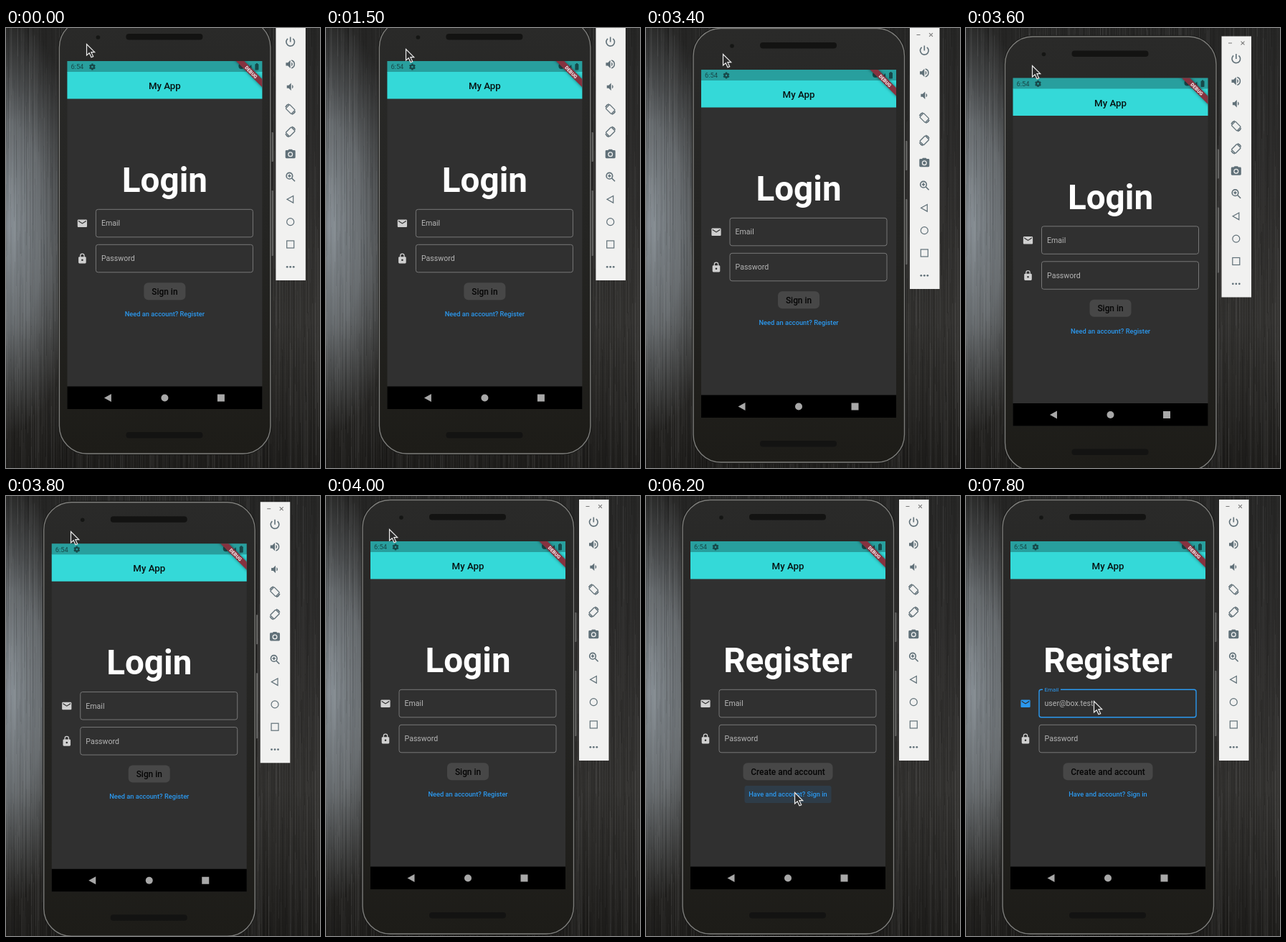
These frames come from a looping animation (438 by 612 pixels, 8000 ms). An HTML page with a canvas:

```html
<!DOCTYPE html>
<html lang="en">
<head>
<meta charset="utf-8">
<title>Login and register</title>
<style>
html, body { margin: 0; overflow: hidden; background: #222; }
canvas { display: block; }
</style>
</head>
<body>
<canvas id="stage" width="438" height="612"></canvas>
<script>
const W = 438, H = 612, LOOP = 8000, STEP = 100;
const c = document.getElementById('stage').getContext('2d');
const BLUE = '#2b98ee', SLATE = '#607078';

const MAIL = new Path2D('M20 4H4c-1.1 0-2 .9-2 2v12c0 1.1.9 2 2 2h16c1.1 0 2-.9 2-2V6c0-1.1-.9-2-2-2zm0 4l-8 5-8-5V6l8 5 8-5v2z');
const LOCK = new Path2D('M18 8h-1V6a5 5 0 0 0-10 0v2H6a2 2 0 0 0-2 2v10a2 2 0 0 0 2 2h12a2 2 0 0 0 2-2V10a2 2 0 0 0-2-2zm-6 9a2 2 0 1 1 0-4 2 2 0 0 1 0 4zm3.1-9H8.9V6a3.1 3.1 0 0 1 6.2 0z');
const SPEAKER = new Path2D('M3 9v6h4l5 5V4L7 9H3zM16.5 12A4.5 4.5 0 0 0 14 8v8a4.5 4.5 0 0 0 2.5-4z');
const WAVE = new Path2D('M14 3.2v2.1a7 7 0 0 1 0 13.4v2.1a9 9 0 0 0 0-17.6z');
const CAMERA = new Path2D('M9 2L7.2 4H4a2 2 0 0 0-2 2v12a2 2 0 0 0 2 2h16a2 2 0 0 0 2-2V6a2 2 0 0 0-2-2h-3.2L15 2zM17 12a5 5 0 1 1-10 0 5 5 0 0 1 10 0z');
const ARROW = new Path2D('M0 0V15.5L3.7 12.2L6.5 18.3L9.2 17.1L6.4 11.2H11.2Z');

const clamp01 = v => Math.min(1, Math.max(0, v));
const progress = (t, from, to) => clamp01((t - from) / (to - from));

// Follows straight moves, each given as {from, to, x, y}
function follow(start, moves, t) {
  return moves.reduce((p, m) => {
    const k = progress(t, m.from, m.to);
    return { x: p.x + (m.x - p.x) * k, y: p.y + (m.y - p.y) * k };
  }, start);
}
const windowAt = t => follow({ x: 23.4, y: -17 }, [
  { from: 3200, to: 3400, x: 15, y: -5 },
  { from: 3400, to: 3600, x: 3.5, y: 6.5 },
  { from: 3600, to: 4000, x: 0, y: 0 }
], t);
const pointerAt = t => follow({ x: 112, y: 22 }, [
  { from: 300, to: 500, x: 194, y: 382 },
  { from: 600, to: 700, x: 384, y: 524 },
  { from: 700, to: 800, x: 6, y: 40 },
  { from: 800, to: 900, x: 229, y: 210 },
  { from: 1000, to: 1500, x: 111, y: 29 },
  { from: 3200, to: 3400, x: 107, y: 36 },
  { from: 3400, to: 3600, x: 92, y: 52 },
  { from: 3600, to: 4000, x: 88, y: 46 },
  { from: 4100, to: 4600, x: 211, y: 405 },
  { from: 5000, to: 5300, x: 207, y: 412 },
  { from: 6500, to: 6900, x: 178, y: 285 }
], t);

function at(x, y, draw) {
  c.save();
  c.translate(x, y);
  draw();
  c.restore();
}
function box(x, y, w, h, r, fill, stroke, width = 1) {
  c.beginPath();
  c.roundRect(x, y, w, h, r);
  if (fill) { c.fillStyle = fill; c.fill(); }
  if (stroke) { c.strokeStyle = stroke; c.lineWidth = width; c.stroke(); }
}
function text(str, x, y, size, color, weight = 400, align = 'center') {
  c.font = `${weight} ${size}px Roboto, sans-serif`;
  c.textAlign = align;
  c.fillStyle = color;
  c.fillText(str, x, y);
}
function triangle(x, y, w, h) {
  c.beginPath();
  c.moveTo(x, y);
  c.lineTo(x + w, y - h / 2);
  c.lineTo(x + w, y + h / 2);
  c.closePath();
}
function arc(x, y, r, a = 0, b = 7) {
  c.beginPath();
  c.arc(x, y, r, a, b);
}
function line(x, y, dx, dy) {
  c.beginPath();
  c.moveTo(x, y);
  c.lineTo(x + dx, y + dy);
  c.stroke();
}
function cross(x, y, r) {
  line(x - r, y, 2 * r, 0);
  line(x, y - r, 0, 2 * r);
}
function glyph(x, y, scale, color, ...paths) {
  at(x, y, () => {
    c.scale(scale, scale);
    c.translate(-12, -12);
    c.fillStyle = color;
    paths.forEach(p => c.fill(p, 'evenodd'));
  });
}
function gradient(g, ...colors) {
  colors.forEach((color, i) => g.addColorStop(i / (colors.length - 1), color));
  return g;
}

// Brushed metal wallpaper, drawn once
const wallpaper = document.createElement('canvas');
wallpaper.width = W;
wallpaper.height = H;
{
  const g = wallpaper.getContext('2d');
  let seed = 7;
  const rnd = () => (seed = seed * 16807 % 2147483647) / 2147483647;
  g.fillStyle = gradient(g.createLinearGradient(0, 0, 0, H), '#262625', '#2d2c2b', '#32312f', '#1d1c1a');
  g.fillRect(0, 0, W, H);
  g.save();
  g.translate(0, 275);
  g.scale(.38, 1);
  g.fillStyle = gradient(g.createRadialGradient(0, 0, 0, 0, 0, 290),
    'rgba(150,159,166,.9)', 'rgba(140,148,154,.6)', 'rgba(120,126,130,0)');
  g.fillRect(0, -275, 1200, H);
  g.restore();
  for (let i = 0; i < 2600; i++) {
    g.fillStyle = `rgba(${rnd() < .4 ? '200,200,200' : '0,0,0'},${rnd() * .08})`;
    g.fillRect(Math.floor(rnd() * W), rnd() * 800 - 200, 1, 80 + rnd() * 250);
  }
}

function statusBar() {
  const ink = '#17494a';
  box(62, 63, 272, 15.5, 0, '#289f9e');
  text('6:54', 67, 74.3, 9.3, ink, 400, 'left');
  at(97, 71, () => {
    c.fillStyle = ink;
    for (let i = 0; i < 6; i++) {
      c.rotate(Math.PI / 3);
      c.fillRect(-1.2, -4.4, 2.4, 3);
    }
    c.strokeStyle = ink;
    c.lineWidth = 2;
    arc(0, 0, 2.5);
    c.stroke();
  });
  c.fillStyle = ink;
  arc(305, 70, 4);
  c.fill();
  triangle(312, 75, 7, 14);
  c.fill();
  box(324, 67, 5, 8.5, 1, ink);
  c.fillRect(325.5, 66, 2, 2);
}

function banner() {
  c.save();
  c.beginPath();
  c.rect(62, 63, 272, 484);
  c.clip();
  c.translate(334, 63);
  c.rotate(Math.PI / 4);
  c.shadowColor = 'rgba(0,0,0,.5)';
  c.shadowBlur = 4;
  box(-30, 17.8, 60, 8, 0, '#86323f');
  c.shadowBlur = 0;
  text('DEBUG', 0, 24.3, 6.7, '#f4e8ea', 900);
  c.restore();
}

function field(y, label, icon, focus, caret) {
  const active = focus > 0;
  glyph(83, y + 19.5, .662, active ? BLUE : '#d0d0d0', icon);
  box(102, y, 219, 38.5, 3, null, active ? BLUE : '#777', active ? 1.4 : 1);
  if (active) {
    c.fillStyle = '#303030';
    c.fillRect(107, y - 2, 25 * focus, 4);
    c.globalAlpha = focus;
    text('user@box.test', 109.5, y + 23, 10.6, '#b4b4b4', 400, 'left');
    c.globalAlpha = 1;
  }
  text(label, 109.5, y + 23 - 20.3 * focus, 10.6 - 2.6 * focus, active ? BLUE : '#b4b4b4', 400, 'left');
  if (caret) {
    c.fillStyle = BLUE;
    c.fillRect(109, y + 12.5, 1.4, 12.5);
  }
}

function app(t) {
  const registering = t >= 6200;
  box(62, 63, 272, 484, 0, '#303030');
  statusBar();
  box(62, 78, 272, 37.5, 0, '#34d9d8');
  text('My App', 198, 102.2, 13.25, '#071212', 500);
  text(registering ? 'Register' : 'Login', 198, 245, 47.6, '#fff', 700);
  field(269.3, 'Email', MAIL, progress(t, 7300, 7600), t >= 7500 && t < 7800);
  field(318.3, 'Password', LOCK, 0);
  const w = registering ? 125 : 58;
  box(198 - w / 2, 371.3, w, 24, 6, '#474747');
  text(registering ? 'Create and account' : 'Sign in', 198, 387.5, 11.9, '#050505', 500);
  if (registering) box(137.5, 403, 121, 24, 3, `rgba(33,150,243,${.12 * (1 - progress(t, 6200, 6400))})`);
  text(registering ? 'Have and account? Sign in' : 'Need an account? Register', 198, 418.2, 9.27, BLUE, 500);
  box(62, 515.5, 272, 31.5, 0, '#000');
  c.fillStyle = '#a8a8a8';
  triangle(113.5, 531.5, 10, 11);
  c.fill();
  arc(198, 531.5, 5);
  c.fill();
  c.fillRect(271.5, 526.5, 10, 10);
  banner();
}

function phone(t) {
  box(346, 162, 3.5, 41, 1, '#666664');
  box(346, 243, 3.5, 91, 1, '#666664');
  const shell = gradient(c.createLinearGradient(0, 5, 0, 610), '#2a2a29', '#242422', '#1d1c18');
  box(50.5, 5, 295.5, 604.5, 39, shell, '#1a1a19', 2.5);
  box(51, 5.5, 294.5, 603.5, 38.5, null, '#7d7d7a', 1.4);
  for (const y of [25, 579]) box(144, y, 107, 8.5, 4, '#131312');
  arc(105, 30, 2.8);
  c.fillStyle = '#151614';
  c.fill();
  app(t);
}

function rotation(side) {
  c.scale(side, 1);
  c.save();
  c.rotate(-Math.PI / 4);
  box(-3.9, -5.4, 7.8, 10.8, 1, null, SLATE, 1.3);
  c.restore();
  for (const a of [0, Math.PI]) {
    arc(0, 0, 7.4, a + .4, a + 1.3);
    c.stroke();
  }
}

const TOOLS = [
  () => { arc(0, .3, 5.8, -.9, 4.04); c.stroke(); line(0, -6.5, 0, 7); },
  () => glyph(0, 0, .7, SLATE, SPEAKER, WAVE),
  () => glyph(1, 0, .66, SLATE, SPEAKER),
  () => rotation(1),
  () => rotation(-1),
  () => { glyph(0, 0, .7, SLATE, CAMERA); arc(0, 0, 2.2); c.fill(); },
  () => { arc(-1.3, -1.3, 4.3); c.stroke(); line(2, 2, 4.3, 4.3); cross(-1.3, -1.3, 2.1); },
  () => { triangle(-4.7, 0, 8.7, 9.6); c.stroke(); },
  () => { arc(0, 0, 5); c.stroke(); },
  () => c.strokeRect(-5, -5, 10, 10),
  () => [-4.5, 0, 4.5].forEach(x => { arc(x, 0, 1.4); c.fill(); })
];

function panel() {
  box(353, 5, 41.5, 363, 0, '#f1f1f0');
  c.strokeStyle = '#777';
  c.lineWidth = 1;
  line(362.5, 14.5, 5, 0);
  at(382.5, 14.5, () => { c.rotate(Math.PI / 4); cross(0, 0, 3.5); });
  TOOLS.forEach((tool, i) => at(373.3, 36 + i * 31.33, () => {
    c.strokeStyle = c.fillStyle = SLATE;
    c.lineWidth = i > 6 ? 1.2 : 1.6;
    tool();
  }));
}

function draw(t) {
  c.drawImage(wallpaper, 0, 0);
  const win = windowAt(t), pointer = pointerAt(t);
  at(win.x, win.y, () => { phone(t); panel(); });
  at(pointer.x + .5, pointer.y + .5, () => {
    c.fillStyle = '#2a2a2a';
    c.fill(ARROW);
    c.strokeStyle = '#ececec';
    c.lineWidth = 1.2;
    c.stroke(ARROW);
  });
}

const start = performance.now();
(function tick() {
  const t = (performance.now() - start) % LOOP;
  draw(Math.floor(t / STEP) * STEP);
  requestAnimationFrame(tick);
})();
</script>
</body>
</html>
```
